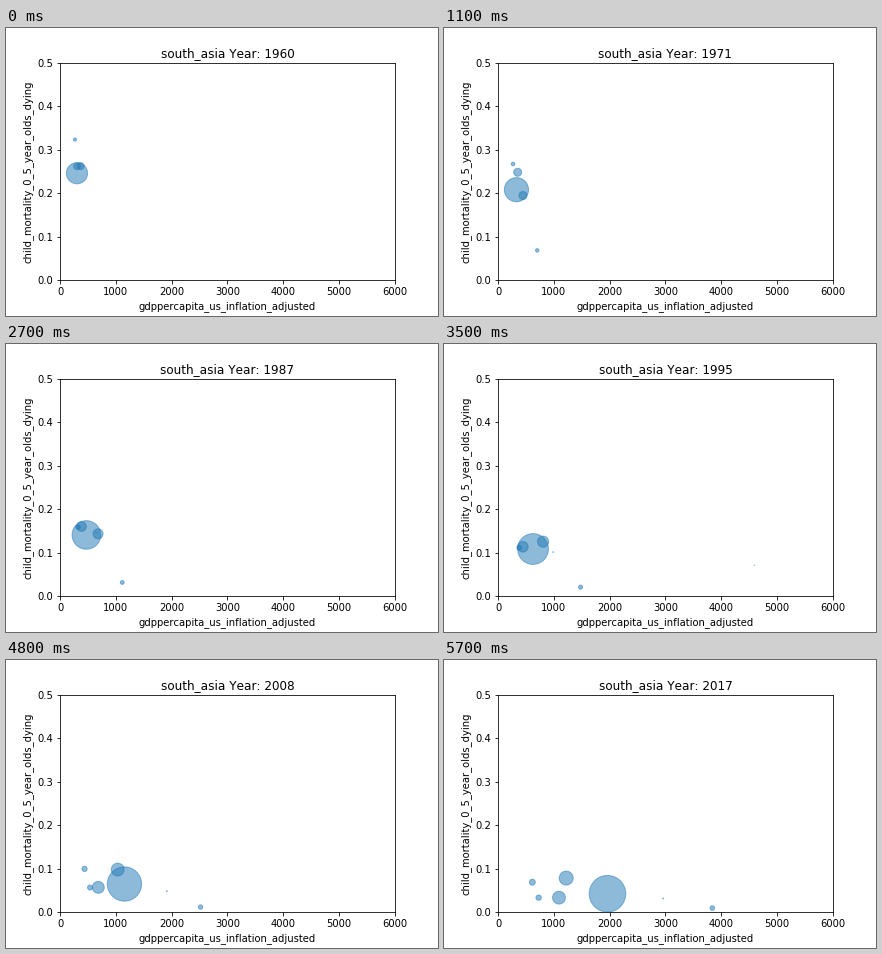
These frames come from a looping animation (432x288 px, 5800 ms). A matplotlib script:

```python
import numpy as np
import matplotlib.pyplot as plt
from matplotlib.animation import FuncAnimation

FIRST, LAST = 1960, 2017
POP_BEND = -0.3

# Per country: first year, then GDP and child deaths per 1000 as
# (start, end, bend, twist), then population in millions (start, end)
COUNTRIES = {
    "Afghanistan": (2002, (358, 615, -0.46, 2.7), (121, 68.5, 0.2), (22, 35.5)),
    "Bangladesh": (1960, (370, 1093, 1.77, -0.4), (262, 33, 0.93, 0.22), (48, 165)),
    "Bhutan": (1980, (440, 2960, -0.08), (175, 31, 0.28, 0.45), (0.4, 0.8)),
    "India": (1960, (304, 1962, 0.95), (245.5, 42, 0.63), (449, 1339)),
    "Maldives": (1995, (4595, 8500, -2), (70.5, 8), (0.25, 0.45)),
    "Nepal": (1960, (268, 728, 1.15, 0.1), (323, 33, 0.64, 0.1), (10, 29)),
    "Pakistan": (1960, (304, 1222, -0.42, -0.2), (261.5, 78, -0.08, -0.42), (45, 197)),
    "Sri Lanka": (1961, (565, 3840, 0.44), (92, 9, -0.05, 0.6), (10, 21.4)),
}


def glide(t, start, end, bend=0, twist=0):
    """Exponential growth from start to end; bend delays it, twist skews the delay."""
    eased = t - t * (1 - t) * (bend + twist * (1 - 2 * t))
    return start * (end / start) ** eased


def snapshot(year):
    spots, sizes = [], []
    for start, gdp, deaths, people in COUNTRIES.values():
        if year >= start:
            t = (year - start) / (LAST - start)
            spots.append((glide(t, *gdp), glide(t, *deaths) / 1000))
            sizes.append(glide(t, *people, POP_BEND))
    return np.array(spots), np.array(sizes)


plt.rcParams["text.kerning_factor"] = 6  # whole-pixel letter spacing
fig, ax = plt.subplots(figsize=(6, 4), dpi=72)
fig.subplots_adjust(left=0.125, right=0.9, bottom=0.125, top=0.88)
bubbles = ax.scatter([], [], s=[], color="C0", alpha=0.5)
ax.set(xlim=(0, 6000), ylim=(0, 0.5),
       xlabel="gdppercapita_us_inflation_adjusted",
       ylabel="child_mortality_0_5_year_olds_dying")
title = ax.set_title("")


def update(i):
    year = FIRST + i
    spots, sizes = snapshot(year)
    bubbles.set_offsets(spots)
    bubbles.set_sizes(sizes)
    title.set_text(f"south_asia Year: {year}")
    return bubbles, title


anim = FuncAnimation(fig, update, frames=LAST - FIRST + 1, interval=100,
                     repeat=True, repeat_delay=0, blit=False)
plt.show()
```
